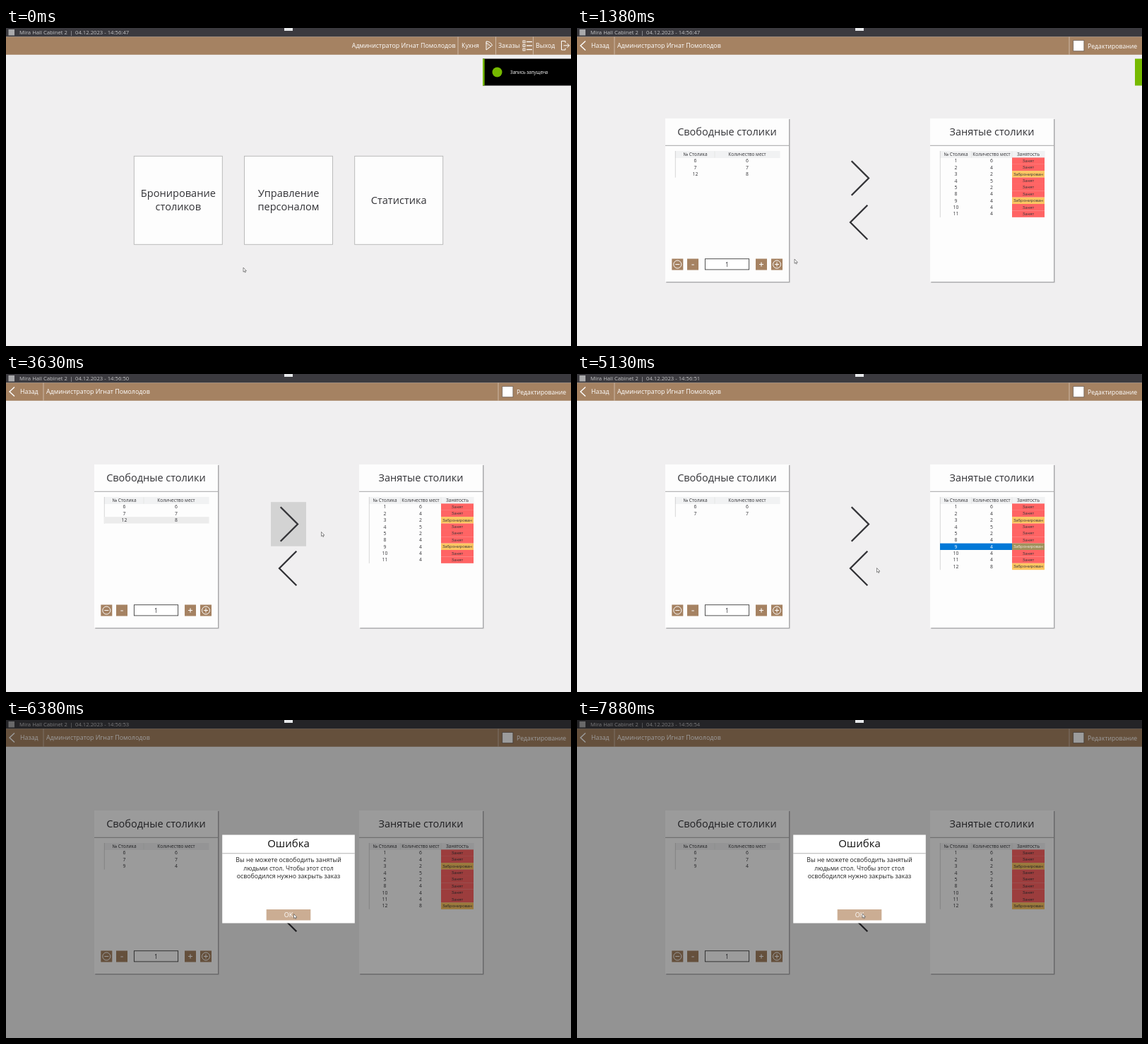
An HTML page for the animation above (8 s loop, 800 by 450 pixels).

```html
<!DOCTYPE html>
<html lang="ru">
<head>
<meta charset="utf-8">
<title>Столики</title>
<style>
html, body { margin: 0; width: 100%; height: 100%; overflow: hidden; background: #f0eff0; }
svg { display: block; width: 100%; height: 100%; font-family: "Open Sans", "Noto Sans", sans-serif; }
</style>
</head>
<body>
<svg id="stage" viewBox="0 0 800 450"></svg>
<script>
const LOOP = 8000, STEP = 125;
const BROWN = '#a58262', INK = '#333337', BLUE = '#0078d7', HOVER = '#d3d3d3';
const APP = 'Mira Hall Cabinet 2', USER = 'Администратор Игнат Помолодов';
const stage = document.getElementById('stage');

const rect = (x, y, w, h, fill, more = '') =>
  `<rect x="${x}" y="${y}" width="${w}" height="${h}" fill="${fill}" ${more}/>`;
const path = (d, color, w = 1) =>
  `<path d="${d}" fill="none" stroke="${color}" stroke-width="${w}"/>`;
// y is the optical middle of the line
const text = (x, y, s, size, fill = INK, anchor = 'middle') =>
  `<text x="${x}" y="${y + size * 0.36}" font-size="${size}" fill="${fill}" text-anchor="${anchor}">${s}</text>`;

// [time, x, y] of the pointer tip
const trail = [
  [0, 336, 339], [300, 336, 339], [750, 287, 290], [900, 287, 290], [1375, 308, 327],
  [1625, 280, 262], [1875, 250, 204], [2125, 250, 204], [2500, 400, 210], [3250, 401, 211],
  [3625, 446.5, 223.5], [4000, 552, 239], [4375, 560, 241], [4750, 558, 241],
  [5125, 424.5, 274.5], [5250, 410, 276], [5500, 410, 276], [5875, 560, 213],
  [6000, 560, 213], [6250, 407.5, 274.5], [7125, 407.5, 274.5], [7500, 404, 274], [8000, 404, 274]
];

function pointer(t) {
  const i = Math.max(1, trail.findIndex(p => p[0] > t));
  const [t0, x0, y0] = trail[i - 1], [t1, x1, y1] = trail[i];
  const k = (t - t0) / (t1 - t0), e = k * k * (3 - 2 * k);
  const x = x0 + (x1 - x0) * e, y = y0 + (y1 - y0) * e;
  return `<path transform="translate(${x} ${y})" d="M0 0V6.2L1.4 4.9L2.4 7L3.4 6.5L2.5 4.6H4.4Z" fill="#fff" stroke="#444" stroke-width=".6"/>`;
}

function clock(t) {
  const ticks = [1625, 2875, 3500, 4750, 5500, 6125, 7000];
  return '04.12.2023 - 14:56:' + (47 + ticks.filter(k => t >= k).length);
}

function titleBar(t) {
  return rect(0, 0, 800, 12.5, '#3b3a3f') + rect(3.5, 2, 8.5, 8.5, '#a9a9ab') +
    text(19, 6.2, APP, 7.7, '#c4c4c6', 'start') + text(92.5, 6, '|', 7.7, '#c4c4c6') +
    text(98, 6.2, clock(t), 7.7, '#c4c4c6', 'start') +
    rect(0, 12.5, 800, 25.3, BROWN);
}

const notch = rect(394, 0, 12, 4, '#e6e8ea');
const divider = x => path(`M${x} 12.5V37.8`, '#cdb8a6');

function home(t) {
  const label = (x, s) => text(x, 24.5, s, 8.8, '#fff', 'start');
  let out = text(636.5, 25, USER, 8.85, '#fff', 'end') +
    [640, 693.5, 746.5].map(divider).join('') +
    label(645, 'Кухня') + label(697, 'Заказы') + label(750, 'Выход') +
    path('M680 19Q686 19 688.5 24.5L680 31ZM679.5 21.5Q684 22 686 26M682 25h1M682.5 28h1', '#fff');
  for (const y of [19.5, 25, 30.5])
    out += rect(732, y - 1.5, 3, 3, 'none', 'stroke="#fff" stroke-width=".9"') + path(`M737 ${y}H745`, '#fff', 1.3);
  out += path('M792 21V18.5H786.5V31H792V28.5M789.5 24.8H797.5M794.5 21.8L797.5 24.8L794.5 27.8', '#fff');
  [['Бронирование', 'столиков'], ['Управление', 'персоналом'], ['Статистика']].forEach((lines, i) => {
    const x = 181.3 + i * 156.2;
    const hot = i === 0 && t >= 625;
    out += rect(x, 181.3, 125, 125, hot ? HOVER : '#fdfdfd', 'stroke="#b4b4b4" stroke-width=".9"');
    lines.forEach((s, j) => { out += text(x + 62.5, 243.3 + (j - (lines.length - 1) / 2) * 18.8, s, 14.6); });
  });
  return out;
}

const seats = { 1: 6, 2: 4, 3: 2, 4: 5, 5: 2, 6: 6, 7: 7, 8: 4, 9: 4, 10: 4, 11: 4, 12: 8 };

function tables(t) {
  const moved12 = t >= 3750, moved9 = t >= 5375;
  const free = [6, 7], busy = [1, 2, 3, 4, 5, 8];
  if (!moved12) free.push(12);
  if (moved9) free.push(9); else busy.push(9);
  busy.push(10, 11);
  if (moved12) busy.push(12);
  const picked = t >= 4375 && t < 5375 ? 9 : t >= 5875 && t < 6375 ? 4 : 0;
  const picked12 = !moved12 && t >= 1875;
  return { free, busy, picked, mark: picked12 ? (t < 2875 ? BLUE : '#ececec') : '' };
}

function panel(x, title) {
  return rect(x + 1.3, 129, 175.2, 231.4, '#a9a9ab') + rect(x, 128, 175, 231, '#fdfdfd') +
    path(`M${x} 166.3H${x + 175}`, '#a5a5a7') + text(x + 87.5, 146.5, title, 14.5);
}

function grid(x, n, heads) {
  let out = rect(x, 174, 148.5, 10, '#f1f2f3') +
    path(`M${x + .3} 174V${183.5 + n * 9.37}`, '#bcbcbc', .6);
  heads.forEach(([cx, s]) => { out += text(cx, 179, s, 6.5); });
  return out;
}

function cells(row, cols, color) {
  return cols.map(([x, s]) => text(x, 188 + row * 9.37, s, 6.8, color)).join('');
}

function freePanel({ free, mark }) {
  let out = panel(125, 'Свободные столики') +
    grid(139, free.length, [[167.5, '№ Столика'], [241, 'Количество мест']]) +
    path('M195 174.5V183.5', '#dedfe0', .6);
  free.forEach((id, i) => {
    const on = id === 12 && mark;
    if (on) out += rect(139, 183.4 + i * 9.37, 148.5, 9.37, mark);
    out += cells(i, [[167.5, id], [241, seats[id]]], on === BLUE ? '#fff' : INK);
  });
  for (const x of [134.3, 156, 253, 275]) out += rect(x, 326.5, 16, 16, BROWN);
  for (const x of [142.3, 283])
    out += `<circle cx="${x}" cy="334.5" r="5.5" fill="none" stroke="#fff" stroke-width="1"/>` +
      path(`M${x - 3} 334.5h6`, '#fff');
  return out + path('M283 331.5v6', '#fff') + path('M162.4 335h3.4M258 334.5h6M261 331.5v6', '#fff', 1.1) +
    rect(181.4, 326.7, 62.2, 15.2, '#fff', 'stroke="#3c3c3c" stroke-width=".9"') + text(212.5, 334.5, '1', 8.6);
}

function busyPanel({ busy, picked }) {
  let out = panel(500, 'Занятые столики') +
    grid(514, busy.length, [[536.5, '№ Столика'], [587, 'Количество мест'], [639, 'Занятость']]) +
    path('M558.5 174.5V183.5M616 174.5V183.5', '#dedfe0', .6);
  busy.forEach((id, i) => {
    const y = 183.4 + i * 9.37, on = id === picked, booked = [3, 9, 12].includes(id);
    const fill = on ? (booked ? '#a0925c' : '#b9504d') : booked ? '#fbc662' : '#ff6464';
    if (on) out += rect(514, y, 102, 9.37, BLUE);
    out += rect(616, y, 46, 9.45, fill) +
      cells(i, [[536.5, id], [587, seats[id]]], on ? '#fff' : INK) +
      text(639, y + 4.5, booked ? 'Забронирован' : 'Занят', 5.85, on ? '#f2ece4' : INK);
  });
  return out;
}

function booking(t) {
  const state = tables(t);
  const hotNext = t >= 2375 && t < 3750;
  const hotBack = (t >= 5250 && t < 5625) || (t >= 6125 && t < 6375);
  return path('M12 18.5L5 25L12 31.5', '#fff', 1.4) + text(20, 24.5, 'Назад', 8.8, '#fff', 'start') +
    text(57, 25, USER, 8.85, '#fff', 'start') + divider(53) + divider(697) +
    rect(702.7, 17.5, 15.2, 15.2, '#fff', 'stroke="#6f6259" stroke-width=".8"') +
    text(723, 25.5, 'Редактирование', 8.7, '#fff', 'start') +
    freePanel(state) + busyPanel(state) +
    (hotNext ? rect(375, 181.2, 50, 62.5, HOVER) : '') +
    (hotBack ? rect(375, 243.7, 50, 62.5, HOVER) : '') +
    path('M388.7 188.2L413 212.5L388.7 236.8', INK, 2.3) +
    path('M411.3 250.7L387 275L411.3 299.3', INK, 2.3);
}

function notice(t) {
  if (t >= 1500) return '';
  if (t < 1250)
    return rect(675, 43.5, 125, 38, '#000') + rect(675, 43.5, 2.6, 38, '#76b900') +
      '<circle cx="695.5" cy="62.5" r="7" fill="#76b900"/>' +
      text(714, 62.8, 'Запись запущена', 6.25, '#fff', 'start');
  const x = t < 1375 ? 700 : 790;
  return rect(x, 43.5, 800 - x, 38, '#76b900');
}

function dialog() {
  const lines = ['Вы не можете освободить занятый', 'людьми стол. Чтобы этот стол', 'освободился нужно закрыть заказ'];
  return rect(0, 0, 800, 450, '#000', 'opacity=".39"') +
    rect(306.2, 162.5, 187.6, 125, '#fff') + text(400, 174.5, 'Ошибка', 15, '#111') +
    path('M306.2 188.8H493.8', '#a8a8a8', .9) +
    lines.map((s, i) => text(400, 198.3 + i * 11.4, s, 8.75, '#222')).join('') +
    rect(368.7, 268, 62.6, 15.5, '#cbad93') + text(400, 275.7, 'OK', 9, '#fff');
}

function draw(t) {
  stage.innerHTML = rect(0, 0, 800, 450, '#f0eff0') + titleBar(t) +
    (t < 1000 ? home(t) : booking(t)) +
    (t >= 6375 ? dialog() : '') + notice(t) + notch + pointer(t);
}

let last = -1;
function tick() {
  const t = Math.floor((performance.now() % LOOP) / STEP) * STEP;
  if (t !== last) draw(last = t);
  requestAnimationFrame(tick);
}
tick();
</script>
</body>
</html>
```
